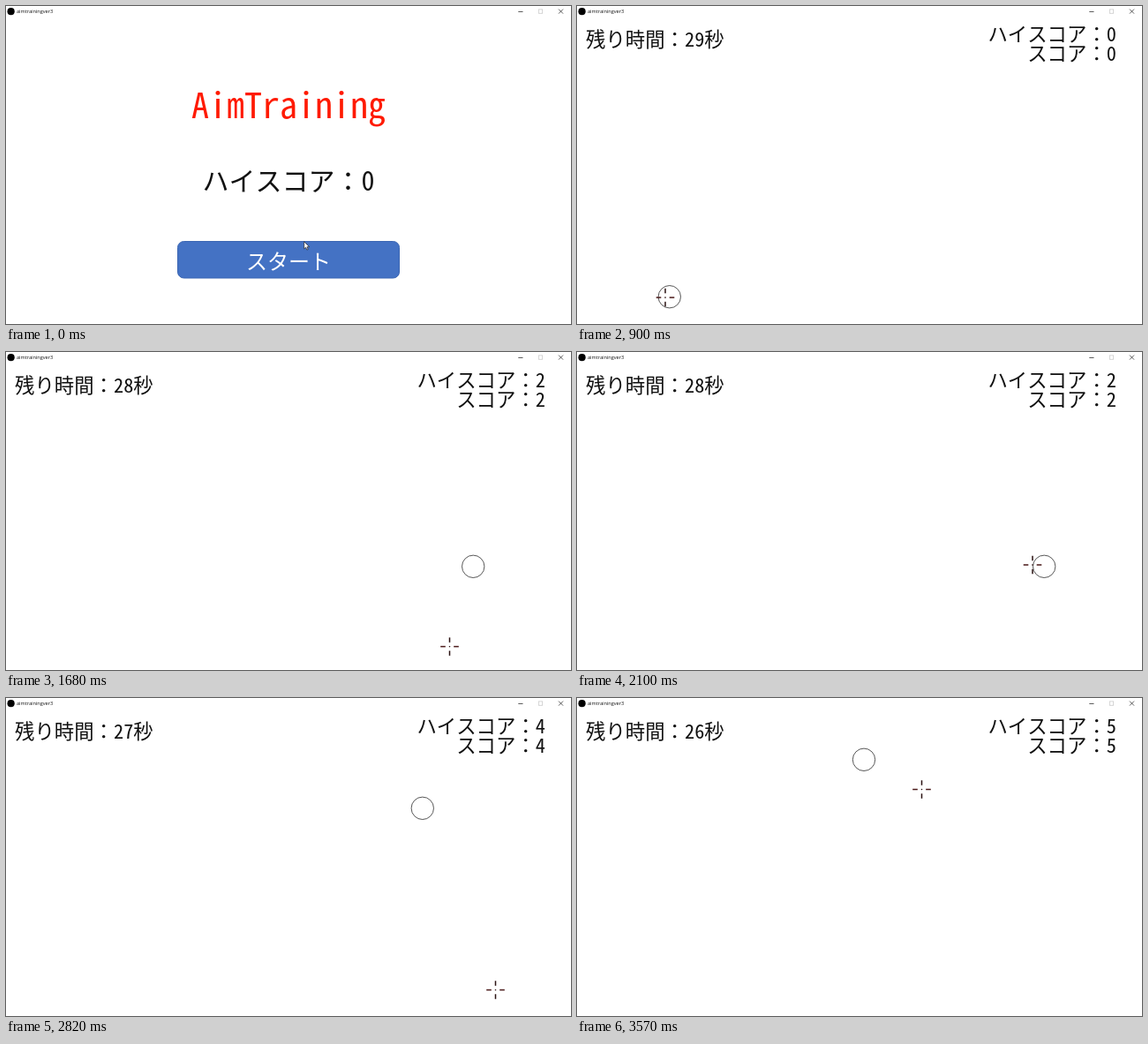
Animation, 640 px wide and 360 px high, one loop 3600 ms. Source, as an HTML page:

```html
<!DOCTYPE html>
<html lang="ja">
<head>
<meta charset="utf-8">
<title>aimtrainingver3</title>
<style>
  html, body { margin: 0; width: 100%; height: 100%; overflow: hidden; background: #fff; }
  svg { display: block; width: 640px; height: 360px; }
  text { font-family: "Noto Sans Mono CJK JP", "Noto Sans CJK JP", "Noto Sans CJK", monospace; fill: #111; white-space: pre; }
  .bar { font: 5.6px "Open Sans", "Noto Sans", sans-serif; fill: #111; }
  .hud { font-size: 22.4px; }
  .mid { text-anchor: middle; }
  .end { text-anchor: end; }
</style>
</head>
<body>
<svg viewBox="0 0 640 360">
  <rect width="640" height="360" fill="#fff"/>
  <circle cx="5.6" cy="6.2" r="4.1" fill="#000"/>
  <text class="bar" x="12" y="8">aimtrainingver3</text>
  <g fill="none" stroke="#333" stroke-width=".8">
    <path d="M580.3 6.5h5.2M626 3.6l5 5m0-5l-5 5"/>
    <rect x="603.4" y="3.9" width="4.2" height="4.4" stroke="#ccc"/>
  </g>

  <g id="menu">
    <text class="mid" x="320" y="127" font-size="40" style="fill:#ff1a00">AimTraining</text>
    <text class="mid" x="320" y="209" font-size="30">ハイスコア：0</text>
    <rect x="194.5" y="266.5" width="251" height="41.5" rx="7" fill="#4472c4" stroke="#3b66b3"/>
    <text class="mid" x="320" y="298" font-size="24" style="fill:#fff">スタート</text>
    <path id="arrow" d="M0 0v8.2l1.9-1.7 1.3 2.9 1.3-.6-1.2-2.8h2.6z" fill="#fff" stroke="#222" stroke-width=".7"/>
  </g>

  <g id="game">
    <text id="time" class="hud" x="10" y="45.5"></text>
    <text id="best" class="hud end" x="611" y="40.3"></text>
    <text id="score" class="hud end" x="611" y="62.3"></text>
    <circle id="target" r="12.7" fill="#fff" stroke="#444" stroke-width=".9"/>
    <g id="aim" fill="none" stroke-width="1.5">
      <path d="M-10.3 0h5.6M4.7 0h5.6" stroke="#4a1818"/>
      <path d="M0-10.3v5.6M0 4.7v5.6" stroke="#2a1212"/>
      <path d="M-.7 0h1.4" stroke="#2a1212" stroke-width="1.3"/>
    </g>
  </g>
</svg>
<script>
const LOOP = 3600, STEP = 60, LAST = 3570, START = 120;
const $ = id => document.getElementById(id);

// moment each target appears, and its centre
const targets = [
  [START, 104.8, 329.2], [960, 500, 330], [1680, 529.2, 242.8],
  [2400, 550, 340.2], [2820, 471.8, 124.8], [3360, 325, 69.8]
];

// pointer stops: time, x, y
const stops = [
  [0, 338, 271], [300, 306, 286], [420, 306, 286],
  [840, 102, 329.5], [900, 100, 330], [1080, 101, 330],
  [1560, 497, 331], [1680, 502.5, 333.5], [1800, 503, 332],
  [2100, 516, 241], [2220, 516, 241], [2460, 501.5, 238.5],
  [2760, 552, 328], [2820, 554.5, 330.5], [2940, 553, 327],
  [3300, 471, 124], [3390, 468, 123], [3570, 390.5, 103.5]
];

function pointer(t) {
  let i = 0;
  while (i < stops.length - 2 && t >= stops[i + 1][0]) i++;
  const [t0, x0, y0] = stops[i], [t1, x1, y1] = stops[i + 1];
  const u = Math.min(1, (t - t0) / (t1 - t0));
  const k = u * u * (3 - 2 * u);
  return [x0 + (x1 - x0) * k, y0 + (y1 - y0) * k];
}

function draw(ms) {
  const t = ms >= LAST ? LAST : Math.floor(ms / STEP) * STEP;
  const playing = t >= START;
  const [x, y] = pointer(t);
  $("menu").style.display = playing ? "none" : "";
  $("game").style.display = playing ? "" : "none";
  $("arrow").setAttribute("transform", `translate(${x - 0.3} ${y - 4.3})`);
  $("aim").setAttribute("transform", `translate(${x} ${y})`);

  const hits = Math.max(0, targets.filter(a => t >= a[0]).length - 1);
  $("target").setAttribute("cx", targets[hits][1]);
  $("target").setAttribute("cy", targets[hits][2]);
  $("time").textContent = `残り時間：${30 - Math.floor((t + 580) / 1000)}秒`;
  $("best").textContent = `ハイスコア：${hits}`;
  $("score").textContent = `スコア：${hits}`;
}

const began = performance.now();
function tick() {
  draw((performance.now() - began) % LOOP);
  requestAnimationFrame(tick);
}
tick();
</script>
</body>
</html>
```
